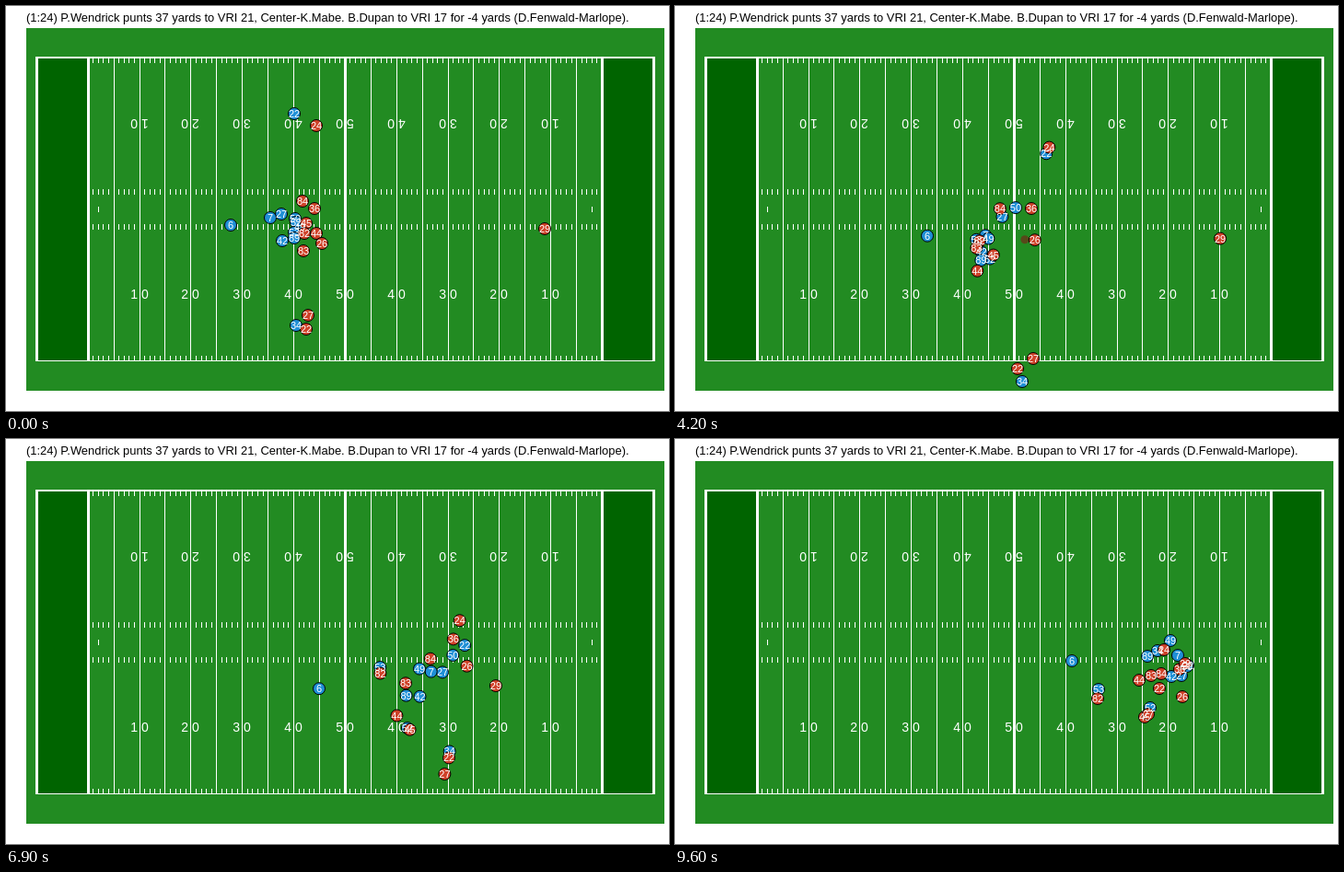
Recreate the animation shown at these times as an HTML page. Size 720x440 px, loop 9700 ms.

```html
<!DOCTYPE html>
<html lang="en">
<head>
<meta charset="utf-8">
<title>Punt return</title>
<style>
html, body { margin: 0; width: 100%; height: 100%; overflow: hidden; background: #fff; }
svg { display: block; width: 720px; height: 440px; font-family: "Liberation Sans", Arial, sans-serif; }
#field { shape-rendering: crispEdges; }
#yards { fill: #fff; font-size: 14px; text-anchor: middle; }
#discs { stroke: #000; stroke-width: 1; }
#labels { fill: #fff; font-size: 11px; text-anchor: middle; }
</style>
</head>
<body>
<svg viewBox="0 0 720 440">
  <text x="22" y="17" font-size="12.93">(1:24) P.Wendrick punts 37 yards to VRI 21, Center-K.Mabe. B.Dupan to VRI 17 for -4 yards (D.Fenwald-Marlope).</text>
  <g id="field"></g>
  <g id="yards"></g>
  <circle id="ball" r="4.5" fill="#57481a"/>
  <g id="discs"></g>
  <g id="labels"></g>
</svg>
<script>
const LOOP = 9700, STEP = 100;
const SNAP = 1200, HELD = 1900, KICK = 2850, CATCH = 6700;
const BLUE = '#1f8fd6', RED = '#cf4128';
const $ = id => document.getElementById(id);
const field = $('field'), yards = $('yards'), ball = $('ball');

function add(parent, tag, attrs, text) {
  const el = document.createElementNS('http://www.w3.org/2000/svg', tag);
  for (const k in attrs) el.setAttribute(k, attrs[k]);
  if (text) el.textContent = text;
  parent.appendChild(el);
  return el;
}

const box = (x, y, width, height, fill = '#fff') => add(field, 'rect', { x, y, width, height, fill });
const yardX = n => Math.floor(89.22 + n * 5.583);

function drawField() {
  box(22, 24, 693, 394, '#228b22');
  box(34, 56, 55, 329, '#006400');
  box(648, 56, 56, 329, '#006400');
  for (let n = 1; n < 100; n++) {
    if (n % 5 === 0) box(yardX(n), 56, 1, 329);
    else for (const y of [56, 199, 237, 380]) box(yardX(n), y, 1, 6);
  }
  for (const x of [100, 636]) box(x, 218, 1, 6);
  for (const x of [32, 88, 367, 646, 702]) box(x, 55, 3, 331);
  box(32, 55, 673, 2);
  box(32, 385, 673, 1);
  for (let n = 10; n < 100; n += 10) {
    const x = yardX(n), label = Math.min(n, 100 - n) / 10 + ' 0';
    add(yards, 'text', { x, y: 318 }, label);
    add(yards, 'text', { x, y: 133, transform: `rotate(180 ${x} 128)` }, label);
  }
}

// Smooth curve through a few timed values, at rest at both ends
function curve(t, times, vals) {
  const last = times.length - 1;
  if (t <= times[0]) return vals[0];
  if (t >= times[last]) return vals[last];
  const slope = i => (vals[i + 1] - vals[i]) / (times[i + 1] - times[i]);
  const tangent = i => {
    if (i === 0 || i === last) return 0;
    const a = times[i] - times[i - 1], b = times[i + 1] - times[i];
    return (b * slope(i - 1) + a * slope(i)) / (a + b);
  };
  let i = 0;
  while (t > times[i + 1]) i++;
  const h = times[i + 1] - times[i], u = (t - times[i]) / h, v = 1 - u;
  return vals[i] * (1 + 2 * u) * v * v + vals[i + 1] * u * u * (3 - 2 * u)
    + h * u * v * (tangent(i) * v - tangent(i + 1) * u);
}

// Each player starts, turns twice and stops; these are the turning times
const timing = (first, second) => [1100, first, second, 9600];
const LINE = timing(2900, 6000), WIDE = timing(4200, 6000);
const TRAIL = timing(2900, 7900), RETURN = timing(4500, 7000);

const players = [];
function player(fill, num, path, times = LINE) {
  const pts = path.split(' ').map(p => p.split(',').map(Number));
  const p = {
    at: t => [0, 1].map(axis => curve(t, times, pts.map(pt => pt[axis]))),
    disc: add($('discs'), 'circle', { r: 6.5, fill }),
    label: add($('labels'), 'text', {}, String(num))
  };
  players.push(p);
  return p;
}

drawField();

player(BLUE, 22, '313,117 358,130 469,209 557,246');
player(BLUE, 27, '299,226 310,219 438,249 550,257');
player(BLUE, 7, '287,230 292,241 423,256 546,235');
player(BLUE, 6, '244,238 255,241 371,267 431,241', TRAIL);
player(BLUE, 50, '314,231 325,217 451,230 556,247');
player(BLUE, 42, '300,255 295,256 411,283 539,258');
player(BLUE, 34, '315,347 377,408 453,375 524,230', WIDE);
player(BLUE, 49, '319,240 308,246 412,257 538,219');
player(BLUE, 52, '315,235 313,247 403,313 516,292');
player(BLUE, 53, '313,246 302,259 382,243 460,272');
player(BLUE, 89, '313,252 301,263 401,288 513,236');

player(RED, 24, '337,130 365,137 470,183 531,229');
player(RED, 84, '322,212 315,214 429,232 528,255');
player(RED, 36, '335,220 348,227 456,210 548,250');
player(RED, 45, '326,236 317,243 408,312 510,302');
player(RED, 82, '324,247 308,259 383,248 459,282');
player(RED, 44, '337,247 305,268 392,307 504,262');
player(RED, 26, '343,258 346,264 472,240 551,280');
player(RED, 83, '323,266 298,261 399,267 517,257');
player(RED, 27, '328,336 389,383 452,381 514,299', WIDE);
player(RED, 22, '326,351 372,394 451,371 526,271', WIDE);
const returner = player(RED, 29, '585,242 589,254 531,268 554,244', RETURN);

const mix = (a, b, u) => a.map((v, i) => v + (b[i] - v) * u);
const part = (t, from, to) => Math.min(1, Math.max(0, (t - from) / (to - from)));

// Snap, short run-up, flight slowed by drag, then carried
function ballAt(t) {
  const center = [319, 240], hands = [251, 240], foot = [263, 243];
  if (t < HELD) return mix(center, hands, part(t, SNAP, HELD));
  if (t < KICK) return mix(hands, foot, part(t, HELD, KICK));
  const u = part(t, KICK, CATCH);
  return mix(foot, returner.at(Math.max(t, CATCH)), u + 0.35 * u * (1 - u));
}

function place(el, x, y, names) {
  el.setAttribute(names[0], x.toFixed(1));
  el.setAttribute(names[1], y.toFixed(1));
}

function draw(ms) {
  const t = Math.floor((ms % LOOP) / STEP) * STEP;
  place(ball, ...ballAt(t), ['cx', 'cy']);
  for (const p of players) {
    const [x, y] = p.at(t);
    place(p.disc, x, y, ['cx', 'cy']);
    place(p.label, x, y + 4, ['x', 'y']);
  }
}

const start = performance.now();
function tick(now) {
  draw(Math.max(0, now - start));
  requestAnimationFrame(tick);
}
draw(0);
requestAnimationFrame(tick);
</script>
</body>
</html>
```
